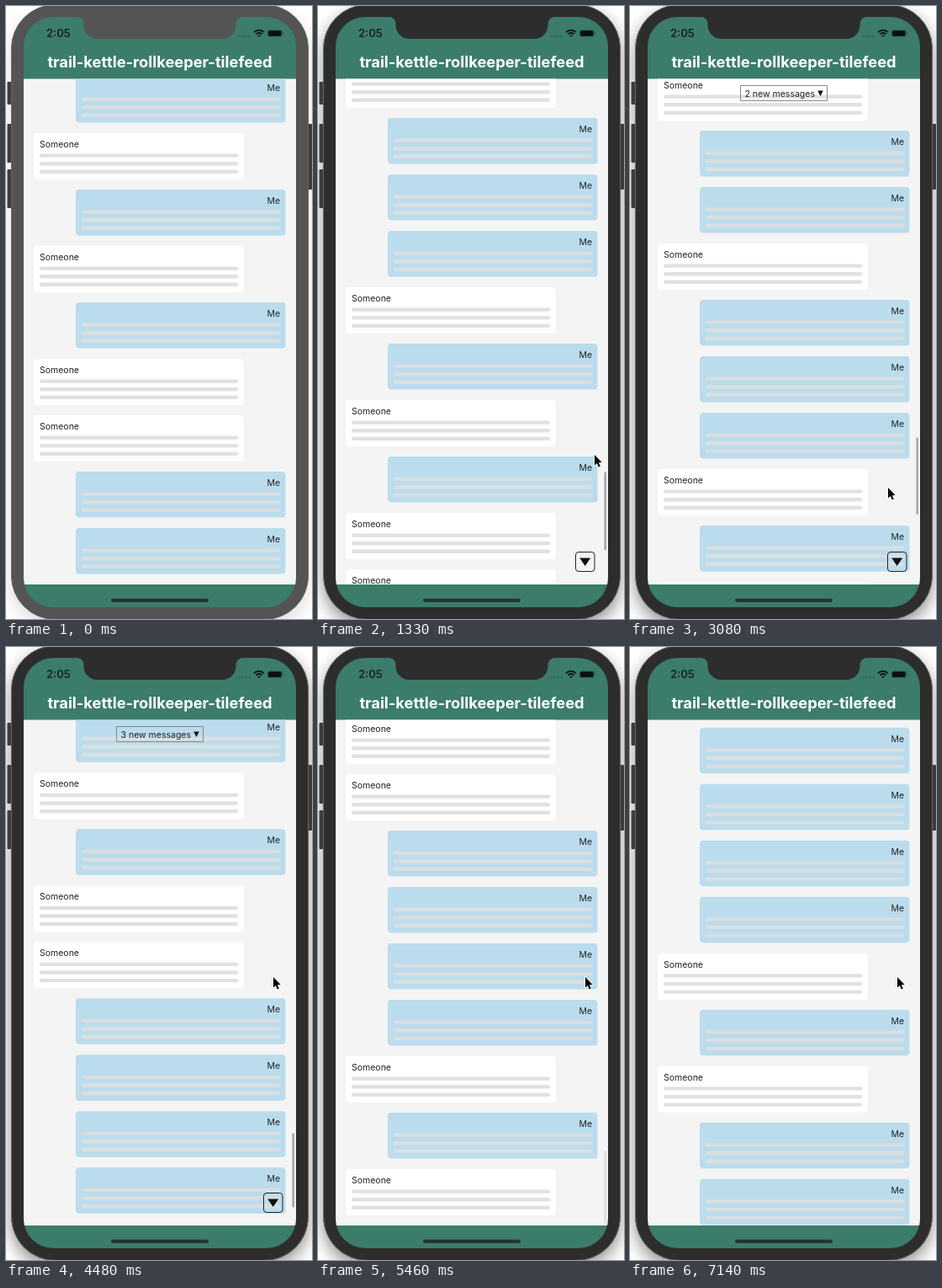
Animation of 364x728 px, one loop 7.21 s. Source, as an HTML page with a canvas:

```html
<!DOCTYPE html>
<html lang="en">
<head>
<meta charset="utf-8">
<style>
  html, body { margin: 0; width: 100%; height: 100%; overflow: hidden; background: #fff; }
  canvas { display: block; }
</style>
</head>
<body>
<canvas id="stage" width="364" height="728"></canvas>
<script>
const ctx = document.getElementById('stage').getContext('2d');
const LOOP = 7210;
const PITCH = 67;
const FIRST = -6;                       // index of the first listed message
const SENDERS = 'SMMSMMMSMSMSSMMMMSMSMM';  // S = someone, M = me

const clamp = u => Math.min(1, Math.max(0, u));
const linear = u => u;
const easeOut = u => 1 - (1 - u) ** 3;
const easeInOut = u => u < .5 ? 2 * u * u : 1 - 2 * (1 - u) ** 2;
const progress = (t, from, to) => clamp((t - from) / (to - from));

// Each move: start, end, target, easing
const SCROLL = [
  [465, 840, -67, easeInOut],
  [860, 1200, 183, easeOut],
  [1600, 1940, 399, easeInOut],
  [4200, 4874, -268, easeOut],
  [4925, 5335, -335, easeInOut],
  [5750, 6160, -402, easeInOut],
  [6840, 7268, -469, easeInOut]
];
const CURSOR_X = [
  [560, 800, 322, easeInOut], [860, 1120, 329, linear],
  [2570, 2800, 322, easeInOut], [2880, 3080, 307, linear],
  [3150, 3640, 314, easeInOut], [4195, 4400, 318, linear]
];
const CURSOR_Y = [
  [560, 800, 330, easeInOut], [860, 1120, 533, easeOut],
  [1330, 1470, 588, easeInOut], [1600, 1940, 555, easeInOut],
  [2570, 2800, 562, easeInOut], [2880, 3080, 572, linear],
  [3150, 3640, 560, easeInOut], [4195, 4400, 392, easeOut]
];
const follow = (moves, value, t) => {
  for (const [from, to, target, ease] of moves)
    value += (target - value) * ease(progress(t, from, to));
  return value;
};
const pulse = (t, a, b, c, d) => progress(t, a, b) * (1 - progress(t, c, d));

function box(x, y, w, h, r, fill, stroke, lineWidth = 1) {
  ctx.beginPath();
  ctx.roundRect(x, y, w, h, r);
  if (fill) { ctx.fillStyle = fill; ctx.fill(); }
  if (stroke) { ctx.strokeStyle = stroke; ctx.lineWidth = lineWidth; ctx.stroke(); }
}

function polygon(points, fill, stroke) {
  ctx.beginPath();
  points.forEach(([x, y]) => ctx.lineTo(x, y));
  ctx.closePath();
  if (stroke) { ctx.strokeStyle = stroke; ctx.lineWidth = 1.4; ctx.stroke(); }
  ctx.fillStyle = fill;
  ctx.fill();
}

function label(text, x, y, size, weight = 400, color = '#222', align = 'left') {
  ctx.font = `${weight} ${size}px Inter, "Liberation Sans", sans-serif`;
  ctx.textAlign = align;
  ctx.fillStyle = color;
  ctx.fillText(text, x, y);
}

const arrowDown = (x, y, w, h) =>
  polygon([[x - w / 2, y], [x + w / 2, y], [x, y + h]], '#111');

function message(mine, y) {
  const x = mine ? 83 : 33;
  box(x, y, 249.5, mine ? 54.5 : 55, 4, mine ? '#bbdcec' : '#fff');
  if (mine) label('Me', 326, y + 17, 10.5, 400, '#222', 'right');
  else label('Someone', 40, y + 17, 10.5);
  for (let i = 0; i < 3; i++)
    box(x + 6.8, y + 24.4 + 9.6 * i, 236.4, 4.4, 2.2, mine ? '#d9dfe2' : '#e1e1e1');
}

function scrollbar(t, scroll) {
  const alpha = Math.max(pulse(t, 840, 920, 3080, 3400), pulse(t, 4190, 4200, 5330, 5510));
  if (!alpha) return;
  const last = t < 1540 ? 9 : t < 4190 ? 10 : t < 4900 ? 12 : 13;
  const content = 3871 + PITCH * (last - 9);
  const below = scroll + PITCH * (last - 8);
  const length = 599 * 601 / content;
  const width = 2.6 + 3.6 * pulse(t, 1500, 1600, 2080, 2240);
  ctx.globalAlpha = alpha;
  box(343 - width, 685 - 599 * below / content - length, width, length, width / 2, '#a6a6a6');
  ctx.globalAlpha = 1;
}

function alerts(t) {
  if (t > 900 && t < 4760) {
    box(306.5, 648.5, 22.5, 23, 3.5, null, '#222');
    arrowDown(317.7, 655.5, 13, 9.5);
  }
  if (t < 1540 || t > 4760) return;
  const count = t < 2590 ? 1 : t < 3780 ? 2 : 3;
  const left = count > 1 ? 131.5 : 134.5;
  const right = 366 - left;
  box(left, 94.5, right - left, 18, 0, null, '#888');
  label(`${count} new message${count > 1 ? 's' : ''}`, left + 5, 107.7, 10.5);
  arrowDown(right - 8, 100.5, 6.5, 6.5);
}

function statusBar() {
  label('2:05', 48, 37, 13, 600, '#17231f');
  for (let i = 0; i < 4; i++) box(276.5 + 4 * i, 35, 2.4, 1.8, .9, '#2d5b4f');
  ctx.strokeStyle = '#0c1512';
  ctx.lineWidth = 2;
  for (const r of [8.3, 5]) {
    ctx.beginPath();
    ctx.arc(301, 37, r, -Math.PI * .75, -Math.PI * .25);
    ctx.stroke();
  }
  polygon([[299, 34.8], [303, 34.8], [301, 37]], '#0c1512');
  box(311, 28.5, 17.5, 8, 2.2, '#2b5a4e');
  box(312, 29.2, 15.5, 6.6, 1.4, '#07100d');
  box(329.3, 31, 1.2, 3, .6, '#2b5a4e');
}

function phoneBody(body, active) {
  ctx.save();
  ctx.shadowColor = `rgba(0,0,0,${active ? .45 : .15})`;
  ctx.shadowBlur = 20;
  ctx.shadowOffsetY = 8;
  box(6.5, -1.5, 353, 730, 52, body);
  ctx.restore();
  for (const [y, h] of [[90, 27], [140, 46], [194, 46]]) box(1.5, y, 6, h, 1, '#3c3c3c');
  box(358, 140, 6, 78, 1, '#3c3c3c');
  box(6.5, -1.5, 353, 730, 52, body, '#666');
}

function notch(body) {
  ctx.beginPath();
  ctx.moveTo(84, 12);
  ctx.lineTo(84, 13);
  ctx.arcTo(92.5, 13, 92.5, 22, 8);
  ctx.arcTo(92.5, 39, 110, 39, 16);
  ctx.arcTo(273.5, 39, 273.5, 22, 16);
  ctx.arcTo(273.5, 13, 282, 13, 8);
  ctx.lineTo(282, 12);
  ctx.fillStyle = body;
  ctx.fill();
}

function pointer(t) {
  if (t < 560) return;
  const x = follow(CURSOR_X, 372, t), y = follow(CURSOR_Y, 400, t);
  const press = Math.max(pulse(t, 800, 860, 1120, 1200),
    pulse(t, 1470, 1520, 2080, 2240), pulse(t, 4180, 4200, 4390, 4460));
  if (press) {
    ctx.globalAlpha = press;
    ctx.beginPath();
    ctx.arc(x, y, 20, 0, 2 * Math.PI);
    ctx.fillStyle = 'rgba(255,255,255,.5)';
    ctx.fill();
    for (const [width, color] of [[5.5, '#fff'], [2.8, '#000']]) {
      ctx.strokeStyle = color;
      ctx.lineWidth = width;
      ctx.stroke();
    }
    ctx.globalAlpha = 1;
  }
  const shape = [[0, 0], [0, 12.5], [2.8, 10], [4.8, 14.6], [6.8, 13.7], [4.9, 9.3], [8.7, 8.9]];
  polygon(shape.map(([dx, dy]) => [x + dx, y + dy]), '#000', '#fff');
}

function draw(t) {
  const active = t >= 700;
  const body = active ? '#2d2d2d' : '#545454';
  const scroll = follow(SCROLL, 0, t);
  ctx.fillStyle = '#fff';
  ctx.fillRect(0, 0, 364, 728);
  phoneBody(body, active);

  ctx.save();
  box(21, 13, 324, 701, 35, '#3b7c6b');
  ctx.clip();
  ctx.save();
  ctx.beginPath();
  ctx.rect(21, 86.5, 324, 600.5);
  ctx.clip();
  ctx.fillStyle = '#f4f4f4';
  ctx.fillRect(21, 86, 324, 602);
  [...SENDERS].forEach((sender, i) => {
    const y = 84 + PITCH * (i + FIRST) + scroll;
    if (y > 20 && y < 690) message(sender === 'M', y);
  });
  scrollbar(t, scroll);
  alerts(t);
  ctx.restore();
  label('trail-kettle-rollkeeper-tilefeed', 183, 73, 18.3, 700, '#fff', 'center');
  statusBar();
  box(125, 703.7, 116, 4.2, 2.1, '#26352f');
  ctx.restore();

  notch(body);
  pointer(t);
}

const start = performance.now();
(function tick() {
  draw((performance.now() - start) % LOOP);
  requestAnimationFrame(tick);
})();
</script>
</body>
</html>
```
